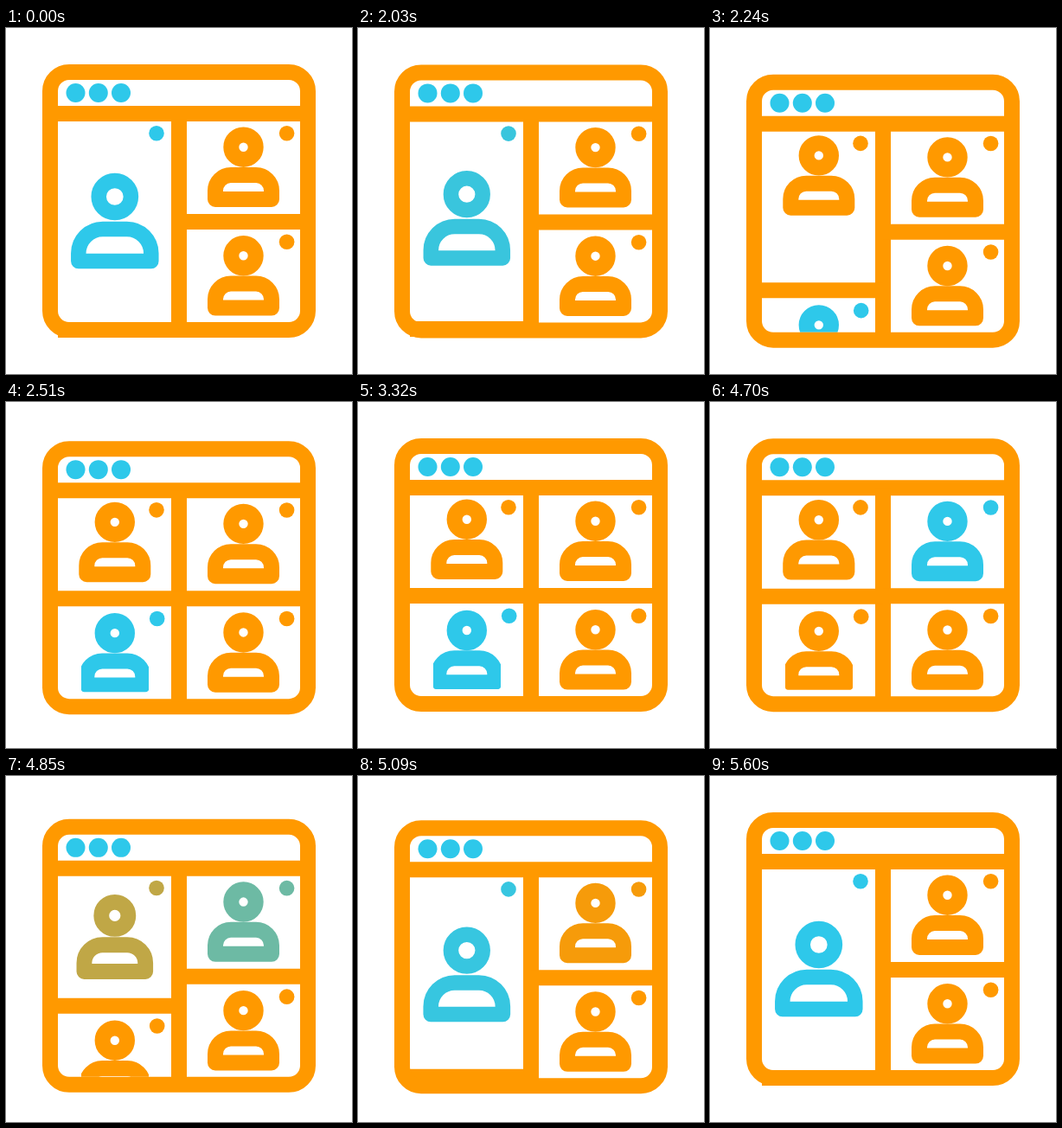
Animation, 400 px wide and 400 px high, one loop 5630 ms. Source, as an HTML page with a canvas:

```html
<!DOCTYPE html>
<html lang="en">
<head>
<meta charset="utf-8">
<title>Video call layout</title>
<style>
  html, body { margin: 0; width: 100%; height: 100%; overflow: hidden; background: #fff; }
  canvas { display: block; }
</style>
</head>
<body>
<canvas width="400" height="400"></canvas>
<script>
const LOOP = 5630;
const TO_GRID = 2000, SWAP = 3600, TO_SPEAKER = 4680;
const ORANGE = [255, 153, 0], BLUE = [46, 200, 234];
const ctx = document.querySelector('canvas').getContext('2d');

const mix = (a, b, k) => a + (b - a) * k;
const rgb = c => `rgb(${c.join()})`;
// Colour of a speaker: 0 is idle orange, 1 is active blue.
const tint = k => rgb(ORANGE.map((v, i) => Math.round(mix(v, BLUE[i], k))));

// Smooth progress from 0 to 1 over a span of time.
function ease(t, start, duration) {
  const p = Math.min(1, Math.max(0, (t - start) / duration));
  return p * p * (3 - 2 * p);
}

const bump = (t, start, rise, fall, height) =>
  height * (ease(t, start, rise) - ease(t, start + rise, fall));

const bounce = (t, start) =>
  bump(t, start, 300, 310, 13) + bump(t, start + 610, 145, 165, 2);

function dot(x, y, r, color) {
  ctx.fillStyle = color;
  ctx.beginPath();
  ctx.arc(x, y, r, 0, 7);
  ctx.fill();
}

function line(x1, y1, x2, y2) {
  ctx.beginPath();
  ctx.moveTo(x1, y1);
  ctx.lineTo(x2, y2);
  ctx.stroke();
}

// (x, y) is the centre of the head; size goes from 0 (tile) to 1 (speaker).
function person(x, y, color, size = 0) {
  const half = mix(32.5, 42, size), r = mix(18, 28, size);
  const top = y + mix(32.3, 37.5, size), bottom = top + mix(28, 37, size);
  ctx.strokeStyle = color;
  ctx.lineWidth = mix(18, 17.5, size);
  ctx.lineJoin = 'round';
  ctx.beginPath();
  ctx.arc(x, y, mix(14.2, 18.6, size), 0, 7);
  ctx.stroke();
  ctx.beginPath();
  ctx.moveTo(x - half, bottom);
  ctx.arcTo(x - half, top, x, top, r);
  ctx.arcTo(x + half, top, x + half, bottom, r);
  ctx.lineTo(x + half, bottom);
  ctx.closePath();
  ctx.stroke();
}

function clipped(x, y, w, h, draw) {
  ctx.save();
  ctx.beginPath();
  ctx.roundRect(x, y, w, h, 3);
  ctx.clip();
  draw();
  ctx.restore();
}

function render(t) {
  const swap = ease(t, SWAP, 300);
  const back = ease(t, TO_SPEAKER, 470);
  const size = t < TO_SPEAKER ? 1 - ease(t, TO_GRID, 220) : back;
  const slide = 125 * (1 - ease(t, TO_GRID, 510) + ease(t, TO_SPEAKER, 500));
  const drop = bounce(t, TO_GRID) + bump(t, SWAP, 270, 290, 3) + bounce(t, TO_SPEAKER);

  const topLeft = tint(size);
  const bottomLeft = tint(1 - swap);
  const topRight = tint(swap * (1 - back));
  const orange = tint(0), blue = tint(1);

  ctx.fillStyle = '#fff';
  ctx.fillRect(0, 0, 400, 400);
  ctx.save();
  ctx.translate(0, drop);

  person(125.8, mix(135.7, 195, size), topLeft, size);
  dot(174, 121.7, 8.8, topLeft);

  clipped(60, 108, 131, 232, () => {
    clipped(87, 230 + slide, 78, 102, () => person(125.8, 264 + slide, bottomLeft));
    if (t < 3140 || t >= 3320) dot(174.7, 247.3 + slide, 8.8, bottomLeft);
  });

  person(274.5, 137.7, topRight);
  if (t < 4310 || t >= 4520) dot(324.6, 121.8, 8.8, topRight);
  person(274.5, 263.3, orange);
  dot(324.6, 247.3, 8.8, orange);

  for (const x of [80.5, 106.8, 133]) dot(x, 75, 11, blue);

  ctx.strokeStyle = orange;
  ctx.lineWidth = 18;
  line(51, 99, 349, 99);
  line(200, 99, 200, 349);
  line(200, 224, 349, 224);
  line(60, 224 + slide, 200, 224 + slide);
  ctx.beginPath();
  ctx.roundRect(51, 51, 298, 298, 22);
  ctx.stroke();
  ctx.restore();
}

function tick() {
  render(performance.now() % LOOP);
  requestAnimationFrame(tick);
}
tick();
</script>
</body>
</html>
```
